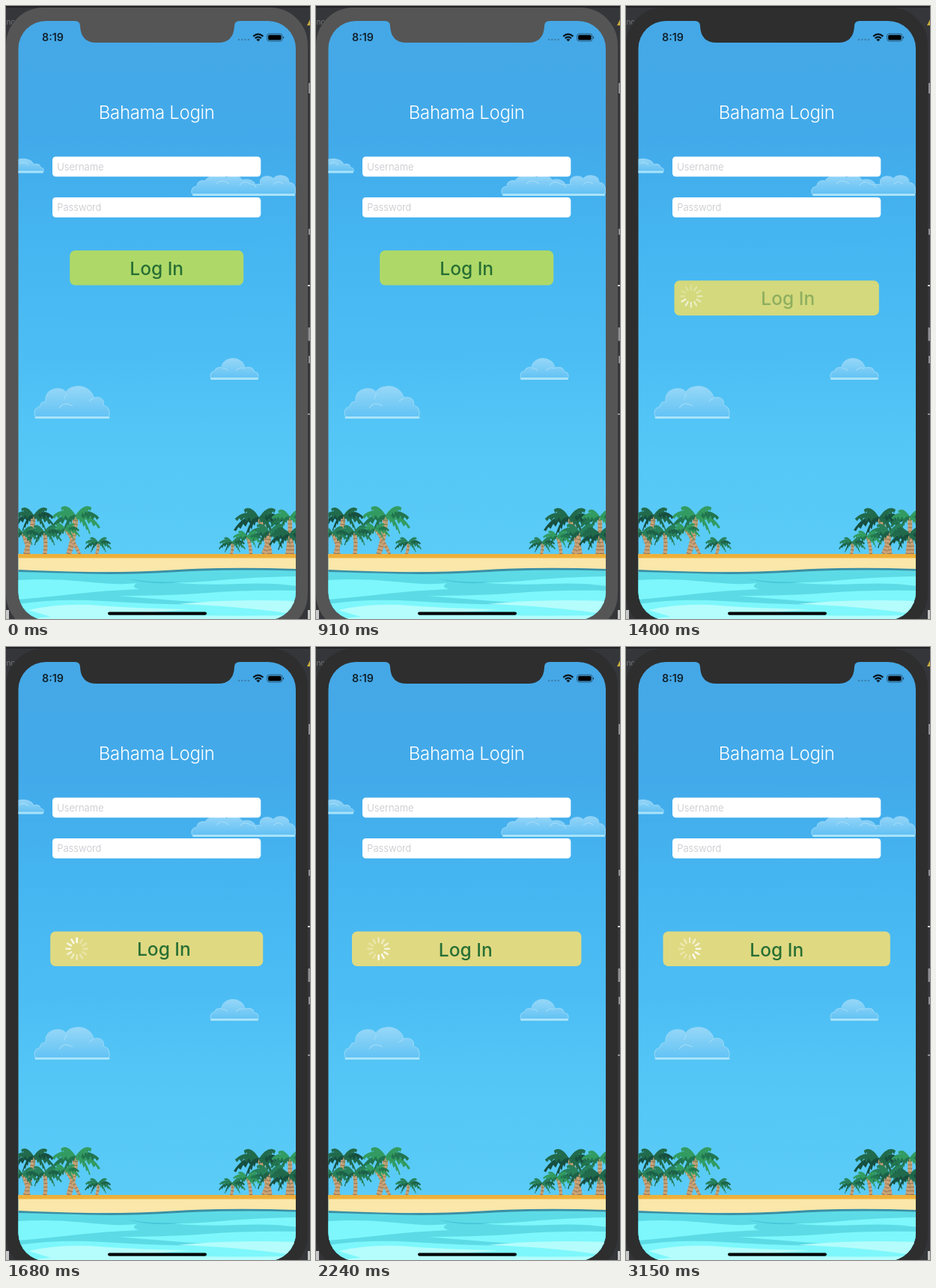
These frames come from a looping animation (406 by 820 pixels, 3220 ms). An HTML page:

```html
<!DOCTYPE html>
<html lang="en">
<head>
<meta charset="utf-8">
<title>Login screen</title>
<style>
  html, body { margin: 0; width: 100%; height: 100%; overflow: hidden; background: #313236; }
  svg { display: block; width: 406px; height: 820px; }
  text { font-family: Inter, "Liberation Sans", sans-serif; }
  .hint { font-size: 13px; font-weight: 300; fill: #c3c4c9; }
</style>
</head>
<body>
<svg viewBox="0 0 406 820" xmlns="http://www.w3.org/2000/svg">
  <defs>
    <linearGradient id="sky" gradientUnits="userSpaceOnUse" x1="0" y1="20" x2="0" y2="735">
      <stop offset="0" stop-color="#46a8e6"/>
      <stop offset=".22" stop-color="#42aaea"/>
      <stop offset=".4" stop-color="#45b5f1"/>
      <stop offset=".62" stop-color="#4cbdf4"/>
      <stop offset=".78" stop-color="#54c6f6"/>
      <stop offset="1" stop-color="#5bccf7"/>
    </linearGradient>
    <linearGradient id="mist" x1="0" y1="0" x2="0" y2="1">
      <stop offset="0" stop-color="#a4dcf9"/>
      <stop offset="1" stop-color="#63c2f4"/>
    </linearGradient>
    <clipPath id="screen"><rect x="16.5" y="20" width="370.5" height="801" rx="37"/></clipPath>
  </defs>

  <!-- desktop behind the phone -->
  <rect width="406" height="820" fill="#35363a"/>
  <rect width="406" height="2" fill="#1f2022"/>
  <text x="-2" y="25" font-size="10" fill="#77787b">inc</text>
  <path d="M402 26l4-8v8z" fill="#c9ad3c"/>
  <g fill="#8f9094">
    <rect x="404" y="103" width="2" height="14"/>
    <rect x="404" y="298" width="2" height="8"/>
    <rect x="403" y="373" width="3" height="2" fill="#d4d4d4"/>
    <rect x="403.5" y="430" width="2.5" height="18"/>
    <rect x="404" y="468" width="2" height="10"/>
    <rect x="403" y="545" width="3" height="2"/>
    <rect x="0" y="808" width="4" height="12" fill="#c8c8c8"/>
    <rect x="403" y="808" width="3" height="12" fill="#c8c8c8"/>
  </g>

  <rect class="shell" x="0" y="2" width="403" height="835" rx="50"/>

  <g clip-path="url(#screen)">
    <rect x="16" y="20" width="372" height="801" fill="url(#sky)"/>
    <g id="clouds"></g>
    <g id="palms"></g>

    <rect x="16" y="733" width="372" height="24" fill="#fae7a9"/>
    <rect x="16" y="733" width="372" height="5.5" fill="#eeb03b"/>
    <path d="M16 754Q60 756 110 757T230 754T388 753V821H16Z" fill="#3a8fa5"/>
    <path d="M16 757Q60 758 110 759.5T230 757T388 755.5V821H16Z" fill="#5cdbe6"/>
    <g fill="#7df7fb">
      <path d="M16 768Q60 765 105 770T175 772Q165 777 178 780Q130 782 96 786T16 794Z"/>
      <path d="M388 763Q330 764 288 768T222 771Q262 775 310 773T388 776Z"/>
      <path d="M388 782Q320 781 270 785T150 789Q210 794 250 797T388 800Z"/>
      <path d="M16 800Q70 792 130 796T260 801T388 806V821H16Z"/>
    </g>
    <g fill="#b4fdfc">
      <path d="M30 808Q75 798 125 802T245 807Q200 811 160 813T60 817Z"/>
      <path d="M230 800Q300 793 388 796V814Q320 803 230 800Z"/>
      <path d="M16 821Q110 811 200 814T388 815V821Z"/>
    </g>
    <path d="M162 766Q195 772 235 770Q200 776 162 766Z" fill="#45c6d8"/>

    <text x="201.2" y="151" font-size="24" font-weight="300" letter-spacing="-.35" text-anchor="middle" fill="#fff">Bahama Login</text>
    <g fill="#fff">
      <rect x="62" y="201.5" width="278.3" height="26.7" rx="4.5"/>
      <rect x="62" y="256" width="278.3" height="26.7" rx="4.5"/>
    </g>
    <text class="hint" x="68.3" y="220">Username</text>
    <text class="hint" x="68.3" y="274.3">Password</text>

    <g id="button">
      <rect id="plate" y="-23.3" height="46.6" rx="7"/>
      <g id="spinner"></g>
      <text id="label" y="9.7" font-size="24.5" font-weight="500" text-anchor="middle" fill="#286f34">Log In</text>
    </g>

    <g fill="#10222e">
      <text x="48" y="47.3" font-size="14.3" font-weight="600">8:19</text>
      <g fill="#3b7fac">
        <circle cx="311" cy="45" r="1.2"/><circle cx="315.3" cy="45" r="1.2"/>
        <circle cx="319.6" cy="45" r="1.2"/><circle cx="323.9" cy="45" r="1.2"/>
      </g>
      <g fill="none" stroke="#0b161e" stroke-width="2.1">
        <path d="M330.2 40.6Q336.8 34.6 343.4 40.6"/>
        <path d="M332.7 43.3Q336.8 39.5 340.9 43.3"/>
      </g>
      <path d="M334.3 44.9Q336.8 42.8 339.3 44.9L336.8 47.5Z"/>
      <rect x="348.7" y="37.2" width="20.3" height="9.8" rx="2.8" fill="none" stroke="#24506f" stroke-width=".9"/>
      <rect x="350.2" y="38.7" width="17.3" height="6.8" rx="1.5" fill="#000"/>
      <path d="M370.2 40.4q2 1.7 0 3.4z"/>
    </g>
    <rect x="136" y="810.4" width="132" height="4.3" rx="2.1" fill="#050708"/>
  </g>

  <path class="shell" d="M92 19V20Q99 20 99 27Q100 49 121 49H283Q304 49 305 27Q305 20 312 20V19Z"/>
</svg>

<script>
const LOOP = 3220, STEP = 70, PRESS = 1260, RELEASE = 1330;
const $ = id => document.getElementById(id);

function add(parent, tag, attrs) {
  const el = document.createElementNS("http://www.w3.org/2000/svg", tag);
  set(el, attrs);
  parent.append(el);
  return el;
}
function set(el, attrs) {
  for (const k in attrs) el.setAttribute(k, attrs[k]);
}

// Clouds: outline, inner curl, bright base
const clouds = [
  ["M10 222.5V208C20 202 34 204 37 212C43 210 46 213 46 216C52 217 51 222.5 47 222.5Z",
   "M18 211q7-4 12 2", 10, 50],
  ["M252 253C246 253 246 242 255 241C255 234 262 233 266 234C272 224 290 224 294 230C302 225 312 226 315 233C324 230 331 234 333 239C336 238 338 238 340 239C336 227 352 225 357 231C363 224 378 226 378 236C388 236 389 253 383 253Z",
   "M281 238q7-8 17 0M312 240q6-8 14-2q6 0 8 5M357 239q6-7 13-1", 249, 386],
  ["M277 499C271 499 272 489 279 488C280 483 286 483 288 484C289 468 316 467 319 484C327 482 331 485 331 489C339 490 338 499 334 499Z",
   "M289 485q5-1 7 3M307 488q5-6 11-3", 273, 337],
  ["M44 551C36 551 36 538 45 536C47 529 50 529 53 529C51 510 75 508 80 517C86 505 112 505 117 524C127 521 132 528 130 534C140 536 140 551 134 551Z",
   "M71 538q6-10 18-3M81 519q-3 3-3 7M117 525q-4 1-6 4", 38.5, 138.5],
];
for (const [body, curl, x1, x2] of clouds) {
  const g = add($("clouds"), "g", { fill: "none", "stroke-width": 1.1 });
  add(g, "path", { d: body, fill: "url(#mist)", stroke: "#9edaf8", opacity: .85 });
  add(g, "path", { d: curl, stroke: "#a9dff9", opacity: .8 });
  add(g, "rect", { x: x1, y: +body.match(/M\d+ (\d+)/)[1] - (x1 === 10 ? 1.5 : 2), width: x2 - x1, height: 3, rx: 1.5, fill: "#a8e3f9" });
}

// One frond: smooth arched back, jagged underside
function frond(x, y, dx, dy, size) {
  const mx = x + dx * .55, my = y + dy * .4 - size * .4;
  let d = `M${x} ${y}Q${mx} ${my} ${x + dx} ${y + dy}`;
  for (let i = 9; i > 0; i--) {
    const u = i / 10, v = 1 - u;
    const px = 2 * u * v * mx + u * u * (x + dx) + v * v * x;
    const py = 2 * u * v * my + u * u * (y + dy) + v * v * y;
    const depth = size * (i % 2 ? .34 : .18) * Math.sin(Math.PI * (.15 + u * .75));
    d += `L${px.toFixed(1)} ${(py + depth).toFixed(1)}`;
  }
  return d + "Z";
}
const fan = [[-1, .5], [1, .5], [-.95, .05], [.95, .1], [-.6, -.3], [.65, -.3], [-.55, .75], [.6, .75], [.05, .7]];
function palm(x, y, size, foot, dark, light) {
  const g = add($("palms"), "g", {});
  const w = size * .11;
  const bend = `Q${(x + foot) / 2 + w} ${(y + 733) / 2} `;
  const stem = `M${foot} 733${bend}${x} ${y}`;
  add(g, "path", { d: stem, fill: "none", stroke: "#c9a276", "stroke-width": w * 2 });
  add(g, "path", { d: stem, fill: "none", stroke: "#8e7053", "stroke-width": w * 2, "stroke-dasharray": "1 4" });
  fan.forEach(([dx, dy], i) => add(g, "path", {
    d: frond(x, y, dx * size, dy * size, size), fill: i % 3 ? light : dark
  }));
}
const deep = ["#174f3f", "#216a4c"], leaf = ["#22764f", "#329b61"], mid = ["#1c6248", "#28805a"];
[
  [37, 681, 28, 26, deep], [93, 681, 33, 84, leaf], [79, 699, 20, 98, leaf],
  [51, 703, 24, 52, mid], [22, 704, 22, 30, mid], [123, 717, 18, 121, mid],
  [338, 684, 34, 352, deep], [379, 683, 26, 376, leaf], [352, 703, 29, 344, mid],
  [378, 707, 27, 382, deep], [322, 709, 20, 327, leaf], [302, 717, 18, 301, mid],
].forEach(([x, y, size, foot, tone]) => palm(x, y, size, foot, ...tone));

const spokes = Array.from({ length: 12 }, (_, i) => add($("spinner"), "rect", {
  x: -1.2, y: -15.5, width: 2.4, height: 8, rx: 1.2, fill: "#fff", transform: `rotate(${i * 30})`
}));

// Damped spring that settles to a thousandth within its duration
function spring(t, duration, damping) {
  if (t <= 0) return 0;
  const k = damping / Math.sqrt(1 - damping * damping);
  const decay = Math.log(1000 * k) / duration;
  const w = decay / k;
  return 1 - Math.exp(-decay * t) * (Math.cos(w * t) + k * Math.sin(w * t));
}
const mix = (a, b, p) => a + (b - a) * p;
const clamp = v => Math.max(0, Math.min(1, v));
const green = [174, 217, 104], sand = [223, 217, 130];
const shells = document.querySelectorAll(".shell");

function draw(ms) {
  const t = (ms - RELEASE) / 1000;
  const grow = spring(t, 1.5, .2), drop = spring(t, .33, .7);
  const width = mix(232, 303.5, grow), left = 201.2 - width / 2;
  const tint = green.map((c, i) => Math.round(mix(c, sand[i], clamp(drop))));

  shells.forEach(s => set(s, { fill: ms < PRESS ? "#555555" : "#2e2e2e" }));
  set($("button"), { transform: `translate(${left} ${mix(350.2, 403.8, drop)})` });
  set($("plate"), { width, fill: `rgb(${tint})` });
  set($("label"), {
    x: t < 0 ? 116 : 151.75,
    opacity: ms < PRESS ? 1 : mix(.2, 1, clamp(t / .28))
  });
  set($("spinner"), {
    transform: `translate(${mix(-18, 35.6, drop)} ${mix(-10, 0, drop)})`,
    opacity: clamp(drop)
  });
  const head = Math.floor((ms - 1680) / 1000 * 12);
  spokes.forEach((s, i) => {
    const age = ((head - i) % 12 + 12) % 12;
    set(s, { opacity: mix(.95, .3, Math.min(age / 8, 1)) });
  });
}

const start = performance.now();
function tick() {
  const ms = (performance.now() - start) % LOOP;
  draw(Math.floor(ms / STEP) * STEP);
  requestAnimationFrame(tick);
}
tick();
</script>
</body>
</html>
```
